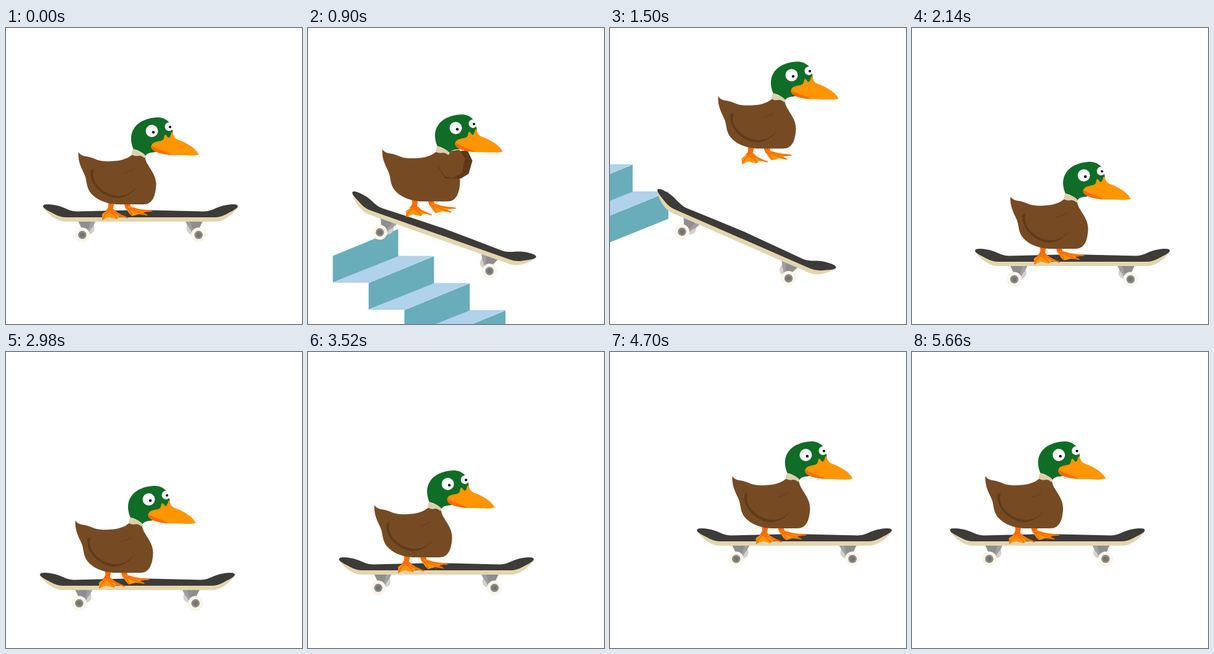
Animation of 480 by 480 pixels, one loop 5.68 s. Source, as an HTML page:

```html
<!DOCTYPE html>
<html>
<head>
<meta charset="utf-8">
<style>
  html, body { margin: 0; width: 100%; height: 100%; overflow: hidden; background: #fff; }
  svg { display: block; width: 100%; height: 100%; }
</style>
</head>
<body>
<svg viewBox="0 0 480 480">
  <g id="stairs"></g>

  <g id="board">
    <g id="half">
      <circle cx="133.500" cy="325" r="10" fill="#d5d1c8"/>
      <path d="M116 312H146L141 322Q136 326 134 335L124 333Q123 324 116 312Z" fill="#a0a0a2"/>
      <path d="M117 312H138L132 330L124 326Z" fill="#8e8e90"/>
      <circle cx="123.700" cy="335.500" r="12" fill="#fcf5e9"/>
      <circle cx="123.700" cy="335.500" r="6.800" fill="#8e8c8a"/>
      <circle cx="123.700" cy="335.500" r="4" fill="#757372"/>
      <path d="M60 289C62 295 72 305 80 309Q88 314 97 314H219V304H110Z" fill="#e3d5ae"/>
      <path d="M60 289C61 285 70 286 78 287C94 289 100 297 115 297.500Q166 296 219 295V307H98Q88 307 79 302C72 298 60 293 60 289Z" fill="#3d3b38"/>
    </g>
    <use href="#half" transform="matrix(-1 0 0 1 436 0)"/>
  </g>

  <g id="duck">
    <path d="M166 284H176L174 293L181 299L166 301L162 296Q168 292 166 284ZM192 284H201L203 291L211 294L199 297Q193 293 192 284Z" fill="#ff6a00"/>
    <path d="M156 302Q163 295 172 296C182 298 186 303 200 308L184 306L180 310L168 307Q160 309 157 312ZM195 290Q201 289 208 291C218 295 230 294 239 297L223 299L231 304L216 302L205 305Q197 299 195 290Z" fill="#ff9500"/>
    <path d="M157 311Q161 301 168 297Q177 303 181 309M171 297Q183 303 198 308M205 304Q203 297 196 291Q214 299 229 303M202 291Q216 297 236 297" fill="none" stroke="#ff6a00" stroke-width="2"/>

    <path d="M118 201C122 209 130 207 138 210C146 212 148 215 160 216C178 217 195 214 203 207L210 203L226 209C227 223 244 234 244 254C243 273 238 286 223 286H184C162 286 144 277 136 265C130 255 132 246 127 236C121 224 117 214 118 201Z" fill="#764b24"/>
    <g id="rest" fill="none">
      <path d="M138 230C133 253 160 276 181 276C200 275 210 262 221 249C207 266 194 274 180 272C158 269 136 250 143 229Z" fill="#5f3b1a"/>
      <path d="M192 235Q201 234 209 228" stroke="#6a4220" stroke-width="1.500"/>
    </g>
    <g id="raised">
      <path d="M208 229L225 206L256 203L264 220L258 241L245 249H220Z" fill="#5c3919"/>
      <path d="M209 223L218 206L243 202L252 217L247 240L232 248L219 245L209 229Z" fill="#764b24"/>
    </g>

    <path d="M207 195Q213 201 219 200Q225 201 228 206L225 211Q221 207 216 207Q210 209 204 205Z" fill="#dccfae"/>
    <path d="M207 196C202 184 202 172 208 163C216 150 234 145 248 145C262 146 271 156 271 170C272 188 255 201 236 202Q229 203 227 207Q221 200 207 196Z" fill="#0f6d27"/>
    <path d="M236 192C238 183 248 185 254 182C258 180 256 174 259 173C262 174 263 180 266 177C268 174 268 169 270 169C272 172 272 178 279 181C294 186 308 195 313 205C309 208 288 206 270 206C254 205 235 201 236 192Z" fill="#ff9500"/>
    <path d="M236 191C246 197 258 199 269 206C254 205 235 201 236 191Z" fill="#ff6a00"/>
    <circle cx="237" cy="167" r="10" fill="#fff"/>
    <circle cx="239.500" cy="169" r="2.200"/>
    <circle cx="265" cy="160" r="7" fill="#fff"/>
    <circle cx="266.500" cy="160.500" r="2"/>
  </g>
</svg>
<script>
const LOOP = 5680, STEPS = 6;
const el = id => document.getElementById(id);
const [stairs, board, duck, rest, raised] = ['stairs', 'board', 'duck', 'rest', 'raised'].map(el);

for (let k = 0; k < STEPS; k++) {
  const tread = k < STEPS - 1 ? '<path d="M41 413H99.500L205 369.500H147Z" fill="#b0d2ea"/>' : '';
  stairs.innerHTML += `<g transform="translate(${58 * k} ${44 * k})">${tread}
    <path d="M41 369.500L147 326V370L41 412.500Z" fill="#68adb9"/></g>`;
}

const move = (node, x, y, extra = '') => node.setAttribute('transform', `translate(${x} ${y}) ${extra}`);

function draw(now) {
  const t = now % LOOP;
  // 0 before start, 1 after end, linear between
  const ramp = (start, end) => Math.min(1, Math.max(0, (t - start) / (end - start)));

  // Stairs roll in level, then climb past as the board descends.
  const descent = Math.max(0, t - 934) / 566;
  move(stairs, 0.67 * (900 - Math.min(t, 934)) - 319 * descent, -280 * descent);

  // Shared drift once both are back on the ground.
  const back = ramp(3160, 4200);
  const drift = 15 * back - 76 * ramp(1805, 3160) + 81 * (ramp(4200, 4700) - ramp(4700, LOOP));
  const rise = -72 * back;

  const tip = ramp(700, 945), land = ramp(1500, 1805);
  move(board, 4 * tip + 57 * land + drift, 36.5 * tip + 35.5 * land + rise,
    `rotate(${23.7 * (tip - land)} 218 288)`);

  const hop = ramp(873, 1400), fall = ramp(1500, 1896);
  move(duck, 58 * hop + 3 * land + drift - 0.5, 163 * fall - 91 * hop + rise);

  const lift = ramp(790, 880) - ramp(1390, 1470);
  rest.style.display = lift ? 'none' : '';
  raised.style.display = lift ? '' : 'none';
  move(raised, 212, 214, `scale(${lift}) translate(-212 -214)`);

  requestAnimationFrame(draw);
}
draw(performance.now());
</script>
</body>
</html>
```
